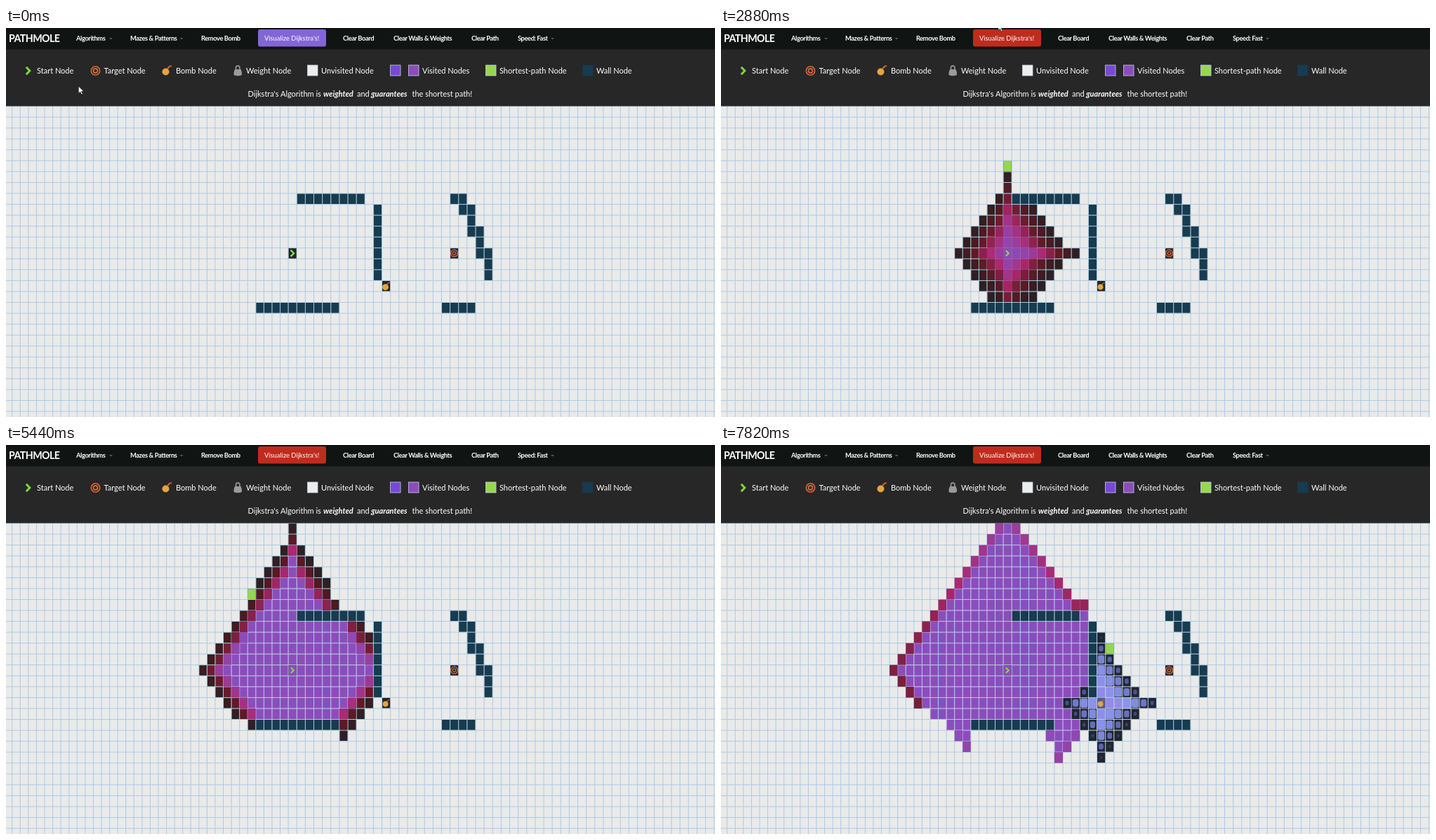
An HTML page with a canvas for the animation above (8000 ms loop, 1010x555 px).

```html
<!DOCTYPE html>
<html>
<head>
<meta charset="utf-8">
<style>
html, body { margin: 0; width: 1010px; height: 555px; overflow: hidden; background: #eaeae9; }
canvas, svg { position: absolute; left: 0; top: 0; }
text { font-family: Lato, sans-serif; font-size: 11px; fill: #fff; white-space: pre; }
.nav text { font-size: 9.35px; font-weight: 700; letter-spacing: -.42px; }
.nav .brand { font-size: 14.2px; letter-spacing: -.55px; }
.nav .go { font-weight: 400; letter-spacing: 0; }
.em { font-weight: 700; font-style: italic; }
</style>
</head>
<body>
<canvas id="board" width="1010" height="555"></canvas>
<svg width="1010" height="555">
  <defs>
    <path id="chevron" d="M-3.2-5.2 1.8 0-3.2 5.2" fill="none" stroke="#7ed63c" stroke-width="3"/>
    <g id="ring" fill="none" stroke="#d9653b"><circle r="6.2" stroke-width="1.6"/><circle r="3" stroke-width="1.8"/></g>
  </defs>
  <rect width="1010" height="31" fill="#101413"/>
  <rect y="30.5" width="1010" height="81" fill="#272727"/>
  <g class="nav">
    <text class="brand" x="4" y="19.5">PATHMOLE</text>
    <text x="100" y="17.5">Algorithms</text>
    <text x="177" y="17.5">Mazes &amp; Patterns</text>
    <text x="278" y="17.5">Remove Bomb</text>
    <rect id="button" x="359" y="2" width="97" height="24.5" rx="3"/>
    <text class="go" x="368" y="17.5">Visualize Dijkstra's!</text>
    <text x="480" y="17.5">Clear Board</text>
    <text x="552" y="17.5">Clear Walls &amp; Weights</text>
    <text x="663" y="17.5">Clear Path</text>
    <text x="729" y="17.5">Speed: Fast</text>
    <path d="M147 14h5l-2.5 2.5zM247.500 14h5l-2.500 2.500zM776 14h5l-2.500 2.500z" fill="#555b5a"/>
  </g>
  <use href="#chevron" x="32" y="61"/>
  <use href="#ring" x="127.500" y="61"/>
  <g><circle cx="227.500" cy="62.500" r="5" fill="#e8a33d"/><path d="M230 58l3-3" stroke="#b97a35" stroke-width="2"/><path d="M232 55l4-1" stroke="#d9542b" stroke-width="2"/></g>
  <path d="M327.500 60v-3a2.700 3 0 0 1 5.400 0v3" fill="none" stroke="#8e8e8e" stroke-width="1.800"/>
  <path d="M326 59h8.500q2 4 1.500 8-6 2.500-11.500 0-.5-4 1.500-8z" fill="#9b9b9b"/>
  <g id="legend"></g>
  <text y="97.500"><tspan x="344.500">Dijkstra's Algorithm is</tspan><tspan class="em" x="452">weighted</tspan><tspan x="500">and</tspan><tspan class="em" x="520">guarantees</tspan><tspan x="578.500">the shortest path!</tspan></text>
  <path id="cursor" d="M0 0v10.500l2.500-2.300 1.800 4 1.800-.8-1.800-3.900h3.400z" fill="#fff" stroke="#111" stroke-width=".7"/>
</svg>
<script>
const $ = id => document.getElementById(id);
const g = $('board').getContext('2d');
const LOOP = 8000, ANIM = 1500, ROW = 15.55, TOP = 111.5, BOMB = [11, 16], TARGET = [19, 13];

// Columns are counted from the start node; those to its left are narrower.
const colX = c => 402 + c * (c < 0 ? 11.57 : 12.13);
const rowY = r => TOP + r * ROW;
const key = (c, r) => c + ',' + r;

$('legend').innerHTML = [
  [44, 'Start Node'], [139.5, 'Target Node'], [242, 'Bomb Node'], [342, 'Weight Node'],
  [449, 'Unvisited Node', '#ededed'], [593, 'Visited Nodes', '#8b4dbc'],
  [703, 'Shortest-path Node', '#97d750'], [841, 'Wall Node', '#173b4f'], [567, '', '#7848d7']
].map(([x, label, fill]) => (fill ? `<rect x="${x - 19.5}" y="53" width="14.5" height="15" fill="${fill}"
  stroke="${label[0] == 'W' ? '#173b4f' : '#c4cfe6'}" stroke-width=".8"/>` : '') +
  `<text x="${x}" y="65">${label}</text>`).join('');

const walls = new Set();
const wall = (c, r, w = 1, h = 1) => {
  for (let i = 0; i < w; i++) for (let j = 0; j < h; j++) walls.add(key(c + i, r + j));
};
wall(1, 8, 8); wall(10, 9, 1, 7); wall(-4, 18, 10); wall(18, 18, 4);
wall(19, 8, 2); wall(20, 9, 2); wall(21, 10); wall(21, 11, 2); wall(22, 12); wall(22, 13, 2); wall(23, 14, 1, 2);

// Dijkstra where each quarter turn costs one extra step; ties go in row order.
function search(from, goal, limit) {
  const moves = [[0, -1], [0, 1], [-1, 0], [1, 0]], nodes = new Map(), order = [];
  nodes.set(key(...from), { c: from[0], r: from[1], d: 0, dir: [1, 0] });
  while (order.length < limit) {
    let best;
    for (const n of nodes.values())
      if (!n.done && (!best || (n.d - best.d || n.r - best.r || n.c - best.c) < 0)) best = n;
    best.done = true;
    order.push(best);
    if (best.c == goal[0] && best.r == goal[1]) break;
    for (const dir of moves) {
      const c = best.c + dir[0], r = best.r + dir[1], k = key(c, r);
      if (r < 0 || walls.has(k)) continue;
      const d = best.d + 2 - (dir[0] * best.dir[0] + dir[1] * best.dir[1]);
      if (!nodes.has(k) || d < nodes.get(k).d) nodes.set(k, { c, r, d, dir });
    }
  }
  return order;
}

// Piecewise linear lookup in rows of [input, ...outputs].
function lerp(rows, x) {
  let i = 1;
  while (i < rows.length - 1 && rows[i][0] < x) i++;
  const a = rows[i - 1], b = rows[i];
  const f = Math.min(1, Math.max(0, (x - a[0]) / (b[0] - a[0])));
  return a.slice(1).map((v, j) => v + (b[j + 1] - v) * f);
}

const pace = [[0, 1400], [31, 1900], [92, 2880], [135, 3730], [193, 4850], [261, 6100], [356, 7820], [370, 8080]];
const first = search([0, 13], BOMB, 400);
const visits = [...first.map(n => ({ ...n, tone: 0 })), ...search(BOMB, TARGET, 80).map(n => ({ ...n, tone: 1 }))]
  .map((n, i) => ({ ...n, at: lerp(pace, i + .5)[0] }));

const tones = [
  [[0, 55, 27, 32], [.25, 70, 24, 31], [.53, 98, 26, 38], [.65, 125, 31, 62], [.8, 172, 40, 112], [1, 139, 77, 188]],
  [[0, 42, 44, 85], [.2, 88, 93, 178], [.37, 125, 135, 215], [.5, 140, 148, 235], [.65, 150, 130, 226], [1, 125, 90, 220]]
];
const rest = ['#2a2225', '#20262e'];
const path = [[0, 103, 83], [130, 130, 72], [330, 200, 55], [850, 390, 16], [1350, 390, 16], [1900, 372, 60],
  [2400, 392, 30], [2880, 395, -7], [3100, 395, -16]];

function fillCell(c, r, color, grow = 0) {
  const x = colX(c), y = rowY(r);
  g.fillStyle = color;
  g.fillRect(x + .6 - grow, y + .6 - grow, colX(c + 1) - x - 1 + 2 * grow, ROW - 1 + 2 * grow);
}

function drawVisit(n, p) {
  const color = `rgb(${lerp(tones[n.tone], p).map(Math.round)})`;
  if (p >= .5) {
    fillCell(n.c, n.r, color, p < 1 && p > .62 ? .5 : 0);
    return;
  }
  fillCell(n.c, n.r, rest[n.tone]);
  const s = lerp([[0, .25], [.2, .55], [.37, .85], [.5, 1]], p)[0];
  const w = (colX(n.c + 1) - colX(n.c) - 1) * s, h = (ROW - 1) * s;
  g.beginPath();
  g.roundRect((colX(n.c) + colX(n.c + 1) - w) / 2, rowY(n.r) + (ROW - h) / 2, w, h, w * (.5 - p * p * 1.6));
  g.fillStyle = color;
  g.fill();
}

function icon(c, r, scale, draw) {
  g.save();
  g.translate((colX(c) + colX(c + 1)) / 2, rowY(r) + ROW / 2);
  g.scale(scale, scale);
  g.beginPath();
  draw();
  g.restore();
}
function line(color, width, ...points) {
  g.beginPath();
  points.forEach(p => g.lineTo(...p));
  g.strokeStyle = color;
  g.lineWidth = width;
  g.stroke();
}
function chevron() { line('#86dd45', 2.4, [-2.5, -4.5], [2, 0], [-2.5, 4.5]); }
function ring() {
  g.strokeStyle = '#dc6a3e';
  g.lineWidth = 1.3;
  g.arc(0, 0, 5, 0, 7);
  g.moveTo(2.3, 0);
  g.arc(0, 0, 2.3, 0, 7);
  g.stroke();
}
function bomb() {
  g.fillStyle = '#e5a53f';
  g.arc(-1, 1.5, 4.3, 0, 7);
  g.fill();
  line('#b97a35', 1.5, [1, -2], [3, -4]);
  line('#d9542b', 1.5, [3, -4], [5.5, -5]);
}

function draw(t) {
  g.fillStyle = '#eaeae9';
  g.fillRect(0, 0, 1010, 555);
  g.fillStyle = '#a9cbe8';
  for (let c = -34; c < 51; c++) g.fillRect(colX(c) - .4, TOP, 1, 444);
  for (let r = 0; r < 29; r++) g.fillRect(0, rowY(r) - .4, 1010, 1);
  for (const k of walls) fillCell(...k.split(',').map(Number), '#173b4f');
  fillCell(0, 13, '#22242a');
  fillCell(...BOMB, '#22242a');
  fillCell(...TARGET, '#22242a');

  const seen = visits.filter(n => n.at <= t), current = seen[seen.length - 1];
  for (const n of seen) drawVisit(n, Math.min(1, (t - n.at) / ANIM));
  if (current) fillCell(current.c, current.r, '#93d94c');
  if (t >= visits[first.length].at) fillCell(...BOMB, '#4a5a9c');

  const started = t - visits[0].at;
  icon(0, 13, started < 0 ? 1 : lerp([[0, .4], [500, .65], [1125, 1.05], [1500, .85]], started)[0], chevron);
  icon(...TARGET, 1, ring);
  icon(...BOMB, started < 0 ? 1.05 : .92, bomb);

  $('button').setAttribute('fill', t < 1250 ? '#8366d6' : '#be2c1d');
  $('cursor').setAttribute('transform', `translate(${lerp(path, t)})`);
}

function tick() {
  draw(performance.now() % LOOP);
  requestAnimationFrame(tick);
}
tick();
</script>
</body>
</html>
```
